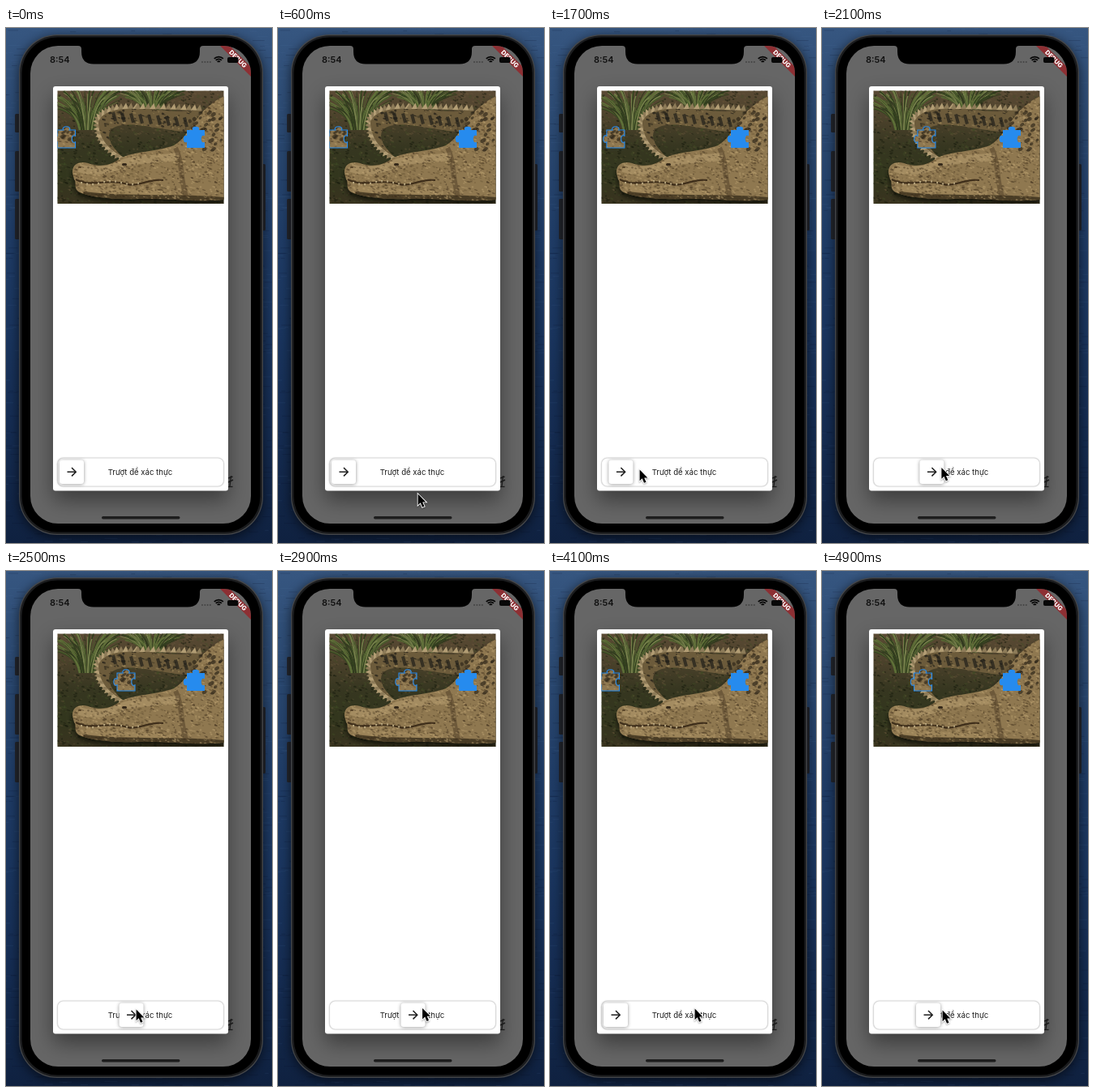
Write an HTML page with a canvas that moves like this. It is 328x636 px and loops after 5 s.

```html
<!DOCTYPE html>
<html lang="vi">
<head>
<meta charset="utf-8">
<title>Slider captcha</title>
<style>
html, body { margin: 0; width: 100%; height: 100%; overflow: hidden; background: #17325a; }
canvas { display: block; width: 328px; height: 636px; }
</style>
</head>
<body>
<canvas id="stage"></canvas>
<script>
const W = 328, H = 636, LOOP = 5000, STEP = 100;
const PHOTO = { x: 63.5, y: 77.5, w: 205, h: 139.5 };
const BLUE = '#268bee', FONT = 'Inter, "Noto Sans", sans-serif';
const TARGET_X = 219, BUTTON_X = 66, GRAB_X = 87.6, LAG = 100;
const dpr = window.devicePixelRatio || 1;

// time, x, y of the pointer tip
const POINTER = [
  [600, 172, 575], [1100, 90, 543], [1300, 76, 546], [1500, 78, 546],
  [1600, 94, 545.5], [1700, 110, 545], [2000, 142, 543], [2400, 161.1, 541],
  [2500, 160, 541], [3200, 190.6, 538], [3300, 192, 538], [3700, 192, 538],
  [4100, 178, 540], [4400, 76, 545], [4500, 78, 545], [4700, 119, 543],
  [4800, 137.6, 542], [4900, 148, 542]
];

function layer(canvas) {
  canvas.width = W * dpr;
  canvas.height = H * dpr;
  const g = canvas.getContext('2d');
  g.scale(dpr, dpr);
  return g;
}

function random(seed) {
  return () => (seed = (seed * 16807) % 2147483647) / 2147483647;
}

function roundBox(g, x, y, w, h, r, fill) {
  g.beginPath();
  g.roundRect(x, y, w, h, r);
  if (fill) { g.fillStyle = fill; g.fill(); }
}

function line(g, pts, color, width) {
  g.beginPath();
  pts.forEach(([x, y]) => g.lineTo(x, y));
  g.strokeStyle = color;
  g.lineWidth = width;
  g.stroke();
}

function fillPath(g, d, color) {
  g.fillStyle = color;
  g.fill(new Path2D(d));
}

function strokePath(g, d, color, width) {
  g.strokeStyle = color;
  g.lineWidth = width;
  g.stroke(new Path2D(d));
}

function shadow(g, color, blur, dy) {
  g.shadowColor = color;
  g.shadowBlur = blur * dpr;
  g.shadowOffsetY = dy * dpr;
}

function vertical(g, y0, y1, colors) {
  const grad = g.createLinearGradient(0, y0, 0, y1);
  colors.forEach((c, i) => grad.addColorStop(i / (colors.length - 1), c));
  return grad;
}

function drawWater(g) {
  const rnd = random(11);
  g.fillStyle = vertical(g, 0, H, ['#365680', '#2a4870', '#1f3c66', '#19345d', '#142b50', '#0f2140']);
  g.fillRect(0, 0, W, H);
  for (let i = 0; i < 1500; i++) {
    const x = rnd() * W - 6, y = rnd() * H, w = 4 + rnd() * 12;
    g.fillStyle = rnd() < 0.5 ? 'rgba(6,16,36,.17)' : 'rgba(85,118,162,.12)';
    g.fillRect(x, y, w, 1);
  }
}

function drawPhone(g) {
  for (const [x, y, h] of [[11, 106, 23], [11, 152, 50], [11, 211, 50], [314, 168, 82]])
    roundBox(g, x, y, 6, h, 1.5, '#23262d');
  g.save();
  shadow(g, 'rgba(0,0,0,.6)', 14, 3);
  roundBox(g, 16, 8, 301, 618, 47, '#45474a');
  g.restore();
  roundBox(g, 17.2, 9.2, 298.6, 615.6, 46, '#1b1c1e');
  roundBox(g, 19.5, 11.5, 294, 611, 44, '#000');
  roundBox(g, 30, 22, 272, 590, 34, '#666');
}

function drawBanner(g) {
  g.save();
  roundBox(g, 30, 22, 272, 590, 34);
  g.clip();
  g.translate(286, 38);
  g.rotate(Math.PI / 4);
  g.fillStyle = '#8d2f33';
  g.fillRect(-40, -4.2, 80, 8.4);
  g.fillStyle = '#fff';
  g.font = '800 7.8px ' + FONT;
  g.textAlign = 'center';
  g.fillText('DEBUG', 0, 2.8);
  g.restore();
}

function drawStatus(g) {
  fillPath(g, 'M89 22Q93 22 93 26V29Q93 44.5 108 44.5H224Q239 44.5 239 29V26Q239 22 243 22Z', '#000');
  g.fillStyle = '#111';
  g.font = '600 11px ' + FONT;
  g.fillText('8:54', 54, 43);
  for (let i = 0; i < 4; i++) roundBox(g, 241 + i * 3.3, 41, 2, 2, 1, '#444');
  for (const r of [2.2, 5, 7.8]) {
    g.beginPath();
    g.arc(262.3, 43.4, r, -Math.PI * 0.75, -Math.PI * 0.25);
    g.strokeStyle = '#050505';
    g.lineWidth = 1.9;
    g.stroke();
  }
  roundBox(g, 273, 36, 13.5, 7, 2, '#080808');
  roundBox(g, 118, 603, 96.5, 3.4, 1.7, '#1e1e1e');
}

function drawGrass(g, rnd, x, y, spread, height, count) {
  const blades = ['#4a5a2c', '#5f7038', '#2f3d1c', '#77804c', '#343a20'];
  for (let i = 0; i < count; i++) {
    const lean = (rnd() - 0.5) * 2, tall = height * (0.5 + rnd() * 0.5);
    g.beginPath();
    g.moveTo(x + lean * 10, y);
    g.quadraticCurveTo(x + lean * spread * 0.4, y - tall * 0.8, x + lean * spread, y - tall);
    g.strokeStyle = blades[i % blades.length];
    g.lineWidth = 0.7 + rnd() * 0.9;
    g.stroke();
  }
}

function drawPhoto(g) {
  const rnd = random(29);
  const speckle = (shape, count, colors, size) => {
    g.save();
    g.clip(new Path2D(shape));
    for (let i = 0; i < count; i++) {
      g.fillStyle = colors[i % colors.length];
      g.beginPath();
      g.ellipse(63 + rnd() * 207, 77 + rnd() * 141, size * (0.5 + rnd()), size * (0.3 + rnd() * 0.5), 0.3, 0, 7);
      g.fill();
    }
    g.restore();
  };
  // small triangular scutes along a quadratic curve
  const scutes = (a, b, c, count, size) => {
    for (let i = 0; i < count; i++) {
      const u = i / (count - 1), v = 1 - u;
      const at = k => v * v * a[k] + 2 * u * v * b[k] + u * u * c[k];
      const dir = k => v * (b[k] - a[k]) + u * (c[k] - b[k]);
      g.save();
      g.translate(at(0), at(1));
      g.rotate(Math.atan2(dir(1), dir(0)));
      fillPath(g, `M${-size * 0.7} 2L${size * 0.2} ${-size}L${size * 0.7} 2Z`, i % 2 ? '#b29d74' : '#8d7b58');
      g.restore();
    }
  };
  g.save();
  g.beginPath();
  g.rect(PHOTO.x, PHOTO.y, PHOTO.w, PHOTO.h);
  g.clip();

  g.fillStyle = vertical(g, 77, 217, ['#5a4a34', '#4b412b', '#363620', '#32361d', '#39331f']);
  g.fillRect(63, 77, 207, 141);
  speckle('M63 77H270V218H63Z', 1500, ['rgba(22,26,12,.5)', 'rgba(112,92,64,.3)', 'rgba(66,78,38,.4)'], 1.6);
  drawGrass(g, rnd, 100, 126, 42, 52, 110);
  drawGrass(g, rnd, 180, 103, 46, 34, 90);

  const tail = 'M147 163C128 155 111 139 112 120C114 102 134 97 157 98C190 99 213 108 240 100L250 124C222 134 190 122 162 120C140 118 127 122 127 133C127 144 138 153 147 163Z';
  fillPath(g, tail, '#6c5b3b');
  speckle(tail, 900, ['rgba(36,33,24,.75)', 'rgba(150,128,84,.6)', 'rgba(58,51,33,.6)'], 1.7);
  for (let i = 0; i < 9; i++)
    line(g, [[132 + i * 11, 104 + i * 0.8], [135 + i * 11, 115 + i * 0.9]], 'rgba(32,31,25,.7)', 4);
  strokePath(g, 'M113 128C115 141 129 154 146 162', '#ad966b', 3.5);
  scutes([147, 164], [112, 146], [112, 116], 14, 5);
  scutes([113, 113], [122, 96], [160, 98], 12, 5.5);
  scutes([162, 98], [200, 98], [238, 100], 13, 5.5);

  // body and head in one outline
  const body = 'M82 179C81 168 91 163 104 168C119 172 130 169 141 161C158 152 185 153 207 145C222 136 229 119 243 103C252 94 260 88 270 84V212C232 216 196 209 164 211C132 212 104 209 91 203C82 198 88 191 84 187Z';
  g.save();
  shadow(g, 'rgba(10,10,4,.8)', 6, 4);
  fillPath(g, body, '#8f7850');
  g.restore();
  g.save();
  g.clip(new Path2D(body));
  strokePath(g, 'M90 173C112 180 132 174 148 166C170 160 193 163 214 158', 'rgba(195,170,124,.4)', 10);
  strokePath(g, 'M98 197C130 204 164 201 204 205', 'rgba(182,156,108,.35)', 7);
  strokePath(g, 'M95 206C140 213 200 207 270 213', 'rgba(36,28,15,.65)', 8);
  strokePath(g, 'M209 148C218 165 214 182 222 208', 'rgba(58,44,25,.4)', 6);
  g.restore();
  speckle(body, 2600, ['rgba(58,44,25,.45)', 'rgba(190,164,116,.45)', 'rgba(110,90,56,.5)'], 1.5);
  for (let i = 0; i < 30; i++) {
    g.fillStyle = 'rgba(44,36,24,.65)';
    g.beginPath();
    g.ellipse(224 + rnd() * 45, 104 + rnd() * 46, 2 + rnd() * 2, 1.5 + rnd(), -0.6, 0, 7);
    g.fill();
  }
  strokePath(g, 'M86 187C105 197 126 186 146 192C162 198 177 185 194 188', 'rgba(50,35,18,.85)', 2.2);
  for (let i = 0; i < 11; i++) {
    const x = 92 + i * 7, y = 190 + Math.sin(i * 0.9) * 2;
    fillPath(g, `M${x} ${y}l1 3.5l1.2 -3.5Z`, '#c9b88f');
  }
  roundBox(g, 143, 167, 6, 3, 1.5, '#35291a');
  roundBox(g, 89, 171, 4, 2, 1, '#594529');
  g.restore();
}

// square with bumps on top and left and a hollow on the right
function piecePath(x) {
  const s = 22, k = 5.6, l = x + 4, r = l + s, t = 126, b = t + s;
  const near = s / 6, far = s * 5 / 6, p = s / 3, q = s * 2 / 3;
  return new Path2D(`M${l} ${t}H${l + p}C${l + near} ${t - k} ${l + far} ${t - k} ${l + q} ${t}H${r}
    V${t + p}C${r - k} ${t + near} ${r - k} ${t + far} ${r} ${t + q}V${b}H${l}
    V${t + q}C${l - k} ${t + far} ${l - k} ${t + near} ${l} ${t + p}Z`);
}

function drawCard(g) {
  g.save();
  shadow(g, 'rgba(0,0,0,.42)', 26, 12);
  roundBox(g, 58, 72, 216, 499.5, 3, '#fff');
  g.restore();
  // sliver of the icon behind the dialog
  line(g, [[274, 556], [279.5, 554]], '#1c1c1c', 1.5);
  line(g, [[274, 561], [280, 558]], '#1c1c1c', 1.5);
  line(g, [[277.5, 553], [276, 566]], '#1c1c1c', 1.3);
  line(g, [[274, 566.5], [279.5, 566.5]], '#1c1c1c', 1.3);
  g.drawImage(photo, 0, 0, W, H);
  g.fillStyle = BLUE;
  g.fill(piecePath(TARGET_X));
  g.save();
  shadow(g, 'rgba(0,0,0,.2)', 2, 0);
  roundBox(g, 63.5, 531, 205, 35, 7, '#fff');
  g.restore();
  g.strokeStyle = '#dadada';
  g.lineWidth = 1.2;
  g.stroke();
  g.fillStyle = '#1c1c1c';
  g.font = '9.6px ' + FONT;
  g.fillText('Trượt để xác thực', 125.7, 551.7);
}

function drawPiece(g, x) {
  const path = piecePath(x);
  g.save();
  g.beginPath();
  g.rect(PHOTO.x, PHOTO.y, PHOTO.w, PHOTO.h);
  g.clip();
  g.save();
  g.clip(path);
  g.drawImage(photo, x - TARGET_X, 0, W, H);
  g.restore();
  g.strokeStyle = BLUE;
  g.lineWidth = 1.1;
  g.stroke(path);
  g.restore();
}

function drawButton(g, x) {
  g.save();
  shadow(g, 'rgba(0,0,0,.42)', 4, 0.5);
  roundBox(g, x, 533.5, 30, 29.5, 3.5, '#fff');
  g.restore();
  line(g, [[x + 9.5, 548.2], [x + 20, 548.2]], '#1c1c1c', 1.5);
  line(g, [[x + 15, 543], [x + 20.2, 548.2], [x + 15, 553.4]], '#1c1c1c', 1.5);
}

function drawPointer(g, x, y) {
  g.save();
  g.translate(x, y);
  const arrow = new Path2D('M0.6 0.6V14.2L3.7 11.3L6 16.8L8.5 15.7L6.2 10.4H10.4Z');
  shadow(g, 'rgba(0,0,0,.35)', 2, 1);
  g.strokeStyle = '#fff';
  g.lineWidth = 1.8;
  g.stroke(arrow);
  g.shadowColor = 'transparent';
  g.fillStyle = '#000';
  g.fill(arrow);
  g.restore();
}

function pointerAt(t) {
  const i = POINTER.findIndex(p => p[0] >= t);
  if (i < 0) return POINTER[POINTER.length - 1].slice(1);
  if (i === 0) return POINTER[0].slice(1);
  const [t0, x0, y0] = POINTER[i - 1], [t1, x1, y1] = POINTER[i];
  const u = (t - t0) / (t1 - t0);
  return [x0 + (x1 - x0) * u, y0 + (y1 - y0) * u];
}

// the button trails the pointer and snaps home on release
function dragAt(t) {
  const held = (t >= 1500 && t < 3700) || t >= 4500;
  return held ? Math.max(0, pointerAt(t - LAG)[0] - GRAB_X) : 0;
}

const photo = document.createElement('canvas');
const scene = document.createElement('canvas');
const view = layer(document.getElementById('stage'));
drawPhoto(layer(photo));
const back = layer(scene);
drawWater(back);
drawPhone(back);
drawBanner(back);
drawStatus(back);
drawCard(back);

const start = performance.now();
function render() {
  const now = Math.max(0, performance.now() - start) % LOOP;
  const t = Math.floor(now / STEP) * STEP;
  const drag = dragAt(t);
  view.drawImage(scene, 0, 0, W, H);
  drawPiece(view, BUTTON_X - 6.5 + drag);
  drawButton(view, BUTTON_X + drag);
  if (t >= POINTER[0][0]) drawPointer(view, ...pointerAt(t));
  requestAnimationFrame(render);
}
render();
</script>
</body>
</html>
```
